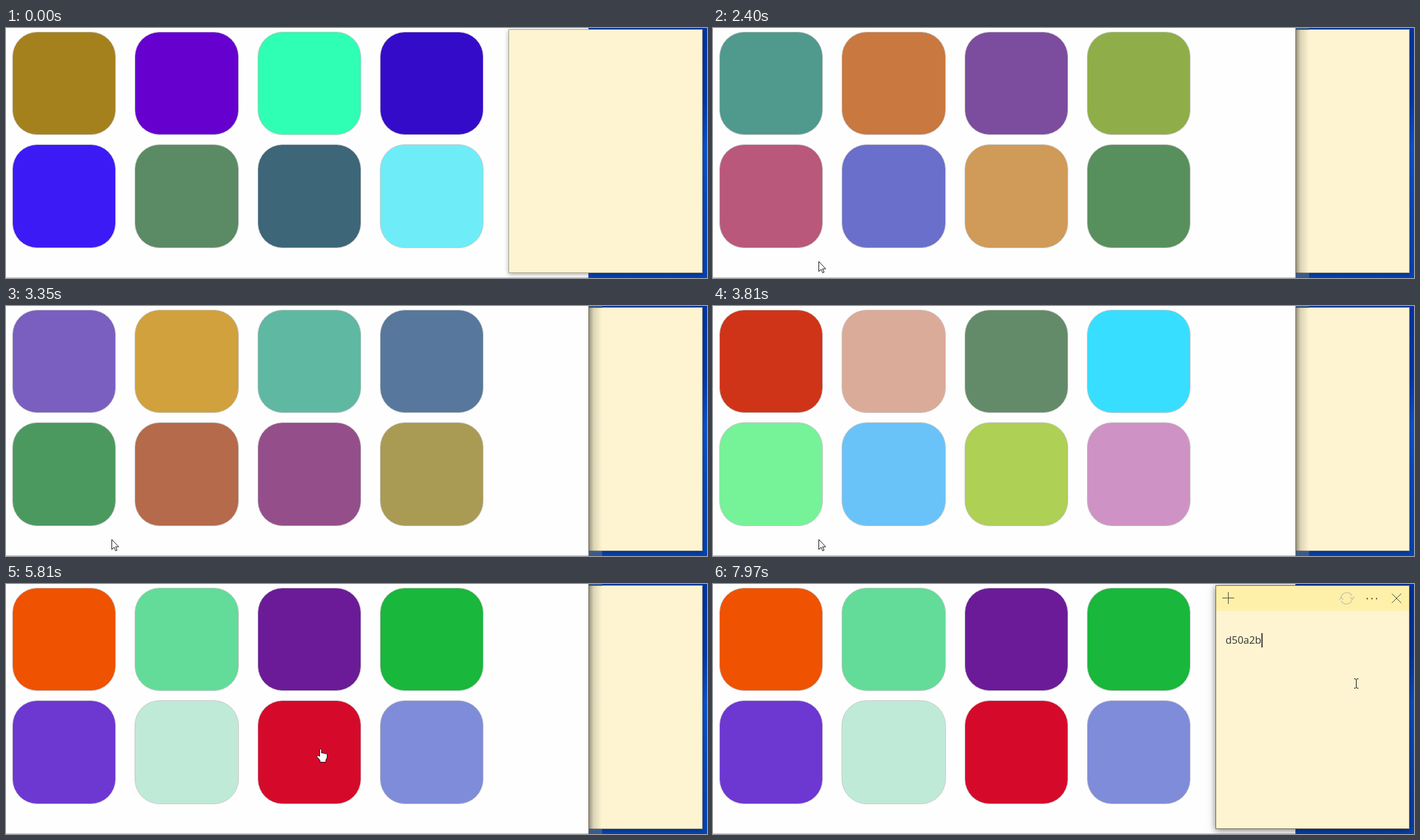
Animation of 1123x402 px, one loop 8 s. Source, as an HTML page without scripts:

```html
<!DOCTYPE html>
<html lang="en">
<head>
<meta charset="utf-8">
<title>Palette copy demo</title>
<style>
html, body { margin: 0; width: 100%; height: 100%; overflow: hidden; }
body { position: relative; background: linear-gradient(#0036a5, #0039ae 28%, #0a53d2 48%, #0648bd 75%, #0543b4); }
div, svg { position: absolute; box-sizing: border-box; }
.stage { width: 1123px; height: 402px; overflow: hidden; isolation: isolate; }
.stage, .stage * { animation: 8s step-end infinite; }

/* browser window */
.window { z-index: 1; width: 933px; height: 402px; background: #fefefe; border-bottom: 1px solid #b9b9b9; }
.edge {
  left: 933px; width: 22px; height: 402px; visibility: hidden; animation-name: window-front;
  background:
    linear-gradient(#3b5a8c, #3b5a8c) 0 0 / 100% 3px no-repeat,
    linear-gradient(#3b5a8c, #3b5a8c) 0 100% / 100% 8px no-repeat,
    linear-gradient(90deg, #0006, #0002 35%, #0000);
  border-left: 1px solid #6b6959;
}
.tiles {
  left: 10px; top: 6px; display: grid; gap: 15.2px 30.13px;
  grid-template: repeat(2, 166.2px) / repeat(4, 166.2px);
}
.tiles i { border: 1px solid #c8c8c8; border-radius: 40px; background: var(--a); animation-name: recolor; }
.toast {
  left: 263px; top: -19px; width: 250px; height: 60px; border-radius: 20px;
  background: rgba(0, 0, 0, .63); color: #fff; visibility: hidden; animation-name: toast;
  font: 25px/70px "Liberation Serif", serif; text-align: center; white-space: nowrap;
}

/* sticky note */
.note {
  z-index: 2; left: 805px; top: 2px; width: 311px; height: 392px;
  background: #fef4d1; border: 1px solid #aaa68f; box-shadow: 0 2px 7px #0005; animation-name: note;
}
.bar { width: 309px; height: 40px; background: #fff0a9; visibility: hidden; animation-name: focus; }
.bar svg { left: -806px; top: -3px; fill: none; stroke: #4a4736; }
.sync { stroke: #c3bfae; visibility: hidden; transform-origin: 1015px 23px; animation-name: sync; }
.text {
  left: 15px; top: 75px; color: #333; visibility: hidden; animation-name: paste;
  font: 16.4px/24px "Open Sans", sans-serif;
}
.caret { left: 15px; top: 76px; width: 1.5px; height: 23px; background: #333; visibility: hidden; animation-name: caret; }

/* mouse pointer */
.pointer {
  --arrow: path("M.5 .5V16.5L4.2 13 6.7 18.7 9 17.7 6.6 12.2H11.5Z");
  --hand: path("M-1.5 12V1.5Q0 -1 1.5 1.5V7Q3 5.5 4.5 7.5Q6 6 7.5 8Q9.5 7 10.5 9V14L8.5 18V21.5H-1V18.5L-6 12.5Q-5.5 9.5 -1.5 12Z");
  --beam: path("M-3 -7.5H-1L.5 -6.5 2 -7.5H4M.5 -6.5V6.5M-3 7.5H-1L.5 6.5 2 7.5H4");
  d: var(--arrow); fill: #fff; stroke: #111; animation-name: move, shape;
}
.top { z-index: 3; }

@keyframes recolor {
  0% { background: var(--a); }
  30% { background: var(--b); }
  37.5% { background: var(--c); }
  41.875% { background: var(--d); }
  47.625% { background: var(--e); }
  51.75% { background: var(--f); }
  55.875%, 100% { background: var(--g); }
}
@keyframes window-front {
  0%, 90.4% { visibility: hidden; }
  21.66% { visibility: visible; }
}
@keyframes note {
  0% { z-index: 2; }
  21.66% { z-index: 0; }
  90.4%, 100% { z-index: 2; border-color: #6b6959; box-shadow: 0 2px 11px #0008; }
}
@keyframes focus { 90.4%, 100% { visibility: visible; } }
@keyframes toast {
  76.875% { visibility: visible; }
  89.55% { visibility: hidden; }
}
@keyframes paste { 97%, 100% { visibility: visible; } }
@keyframes caret {
  91.25% { visibility: visible; transform: none; }
  97%, 100% { visibility: visible; transform: translateX(57.5px); }
}
@keyframes sync {
  97.875% { visibility: visible; transform: rotate(-60deg); }
  98.75% { visibility: visible; transform: rotate(-30deg); }
  99.625%, 100% { visibility: visible; transform: none; }
}
@keyframes shape {
  0%, 12.3%, 84.4% { d: var(--arrow); }
  11.4%, 65.8% { d: var(--hand); }
  86.1%, 100% { d: var(--beam); }
}
@keyframes move {
  0% { transform: translate(-50px, -50px); }
  10.625% { transform: translate(55px, 385px); }
  11.48% { transform: translate(110px, 330px); }
  12.34% { transform: translate(178px, 275px); }
  13.2% { transform: translate(196px, 257px); }
  14.05% { transform: translate(199px, 284px); }
  14.91% { transform: translate(194px, 322px); }
  15.76% { transform: translate(184px, 350px); }
  16.625% { transform: translate(178px, 363px); }
  19.125% { transform: translate(172px, 369px); }
  19.97% { transform: translate(166px, 374px); }
  20.81% { transform: translate(163px, 376px); }
  21.66% { transform: translate(169px, 375px); }
  65% { transform: translate(190px, 359px); }
  65.84% { transform: translate(291px, 266px); }
  66.69% { transform: translate(410px, 227px); }
  67.53% { transform: translate(510px, 252px); }
  68.375% { transform: translate(558px, 288px); }
  70.875% { transform: translate(546px, 282px); }
  71.75% { transform: translate(525px, 272px); }
  72.625% { transform: translate(504px, 265px); }
  73.5% { transform: translate(497px, 265px); }
  74.375% { transform: translate(508px, 267px); }
  82.75% { transform: translate(530px, 265px); }
  83.6% { transform: translate(640px, 245px); }
  84.45% { transform: translate(790px, 212px); }
  85.3% { transform: translate(920px, 179px); }
  86.15% { transform: translate(1005px, 158px); }
  87% { transform: translate(1030px, 154px); }
  87.85% { transform: translate(1030px, 157px); }
  88.7%, 100% { transform: translate(1030px, 160px); }
}
</style>
</head>
<body>
<div class="stage">
  <div class="window">
    <div class="tiles">
      <i style="--a:#a5811e;--b:#4f9a8c;--c:#da8074;--d:#7a5fc0;--e:#cf3418;--f:#58a34e;--g:#ef5200"></i>
      <i style="--a:#6600cf;--b:#c9783f;--c:#37681f;--d:#d0a13c;--e:#dbab99;--f:#4673b5;--g:#62dc98"></i>
      <i style="--a:#2fffb4;--b:#7c4d9e;--c:#bb244f;--d:#5fb8a2;--e:#648b69;--f:#b85d74;--g:#6b1b98"></i>
      <i style="--a:#350bca;--b:#8fae49;--c:#e88310;--d:#57789c;--e:#38deff;--f:#9c7b3a;--g:#19b73b"></i>
      <i style="--a:#3c1af6;--b:#b9587b;--c:#c87ba7;--d:#4c9960;--e:#76f298;--f:#a763b1;--g:#6d37d2"></i>
      <i style="--a:#5b8b65;--b:#6a6fcb;--c:#93a4ec;--d:#b56b4b;--e:#6ac3f8;--f:#8ebc73;--g:#bfead7"></i>
      <i style="--a:#3d6678;--b:#d09a58;--c:#16ff5c;--d:#944f8b;--e:#add055;--f:#518f9a;--g:#d50a2b"></i>
      <i style="--a:#6eedf8;--b:#58905d;--c:#17e2c5;--d:#a99b54;--e:#ce93c4;--f:#655bb4;--g:#7f8cd9"></i>
    </div>
    <div class="toast">copied :)</div>
    <div class="edge"></div>
  </div>

  <div class="note">
    <div class="bar">
      <svg width="1123" height="43">
        <path d="M816 22.5H835M825.5 13V32M1087.5 15.5L1102.5 30.5M1102.5 15.5L1087.5 30.5"/>
        <path d="M1047 23.5H1064" stroke-width="2.2" stroke-dasharray="2.2 5.3"/>
        <path class="sync" stroke-width="1.3" d="M1006 22A9.3 9.3 0 0 1 1023.5 19M1024 24A9.3 9.3 0 0 1 1006.5 27M1020.5 21L1024 24.5 1027 20.5M1003.5 25.5L1006 21.5 1009.5 25"/>
      </svg>
    </div>
    <div class="text">d50a2b</div>
    <div class="caret"></div>
  </div>

  <svg class="top" width="1123" height="402"><path class="pointer"/></svg>
</div>
</body>
</html>
```
